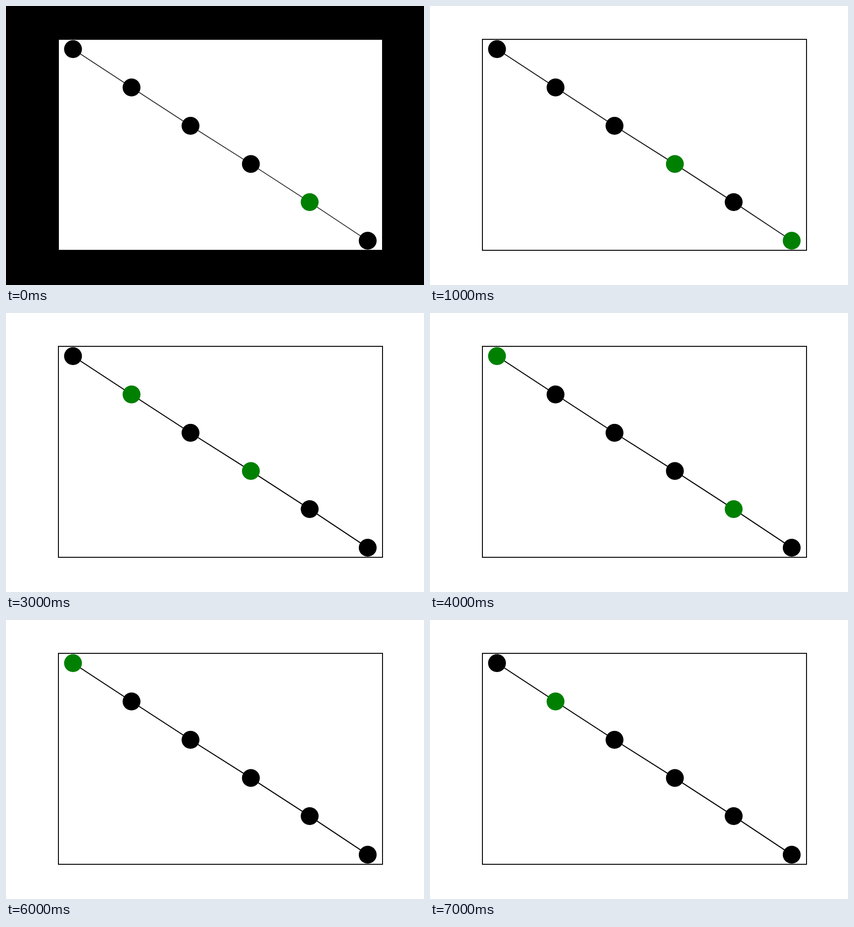
An HTML page with a canvas that plays this animation: 917 by 611 pixels, repeating every 8000 ms.

```html
<!DOCTYPE html>
<html lang="en">
<head>
<meta charset="utf-8">
<title>Cellular automaton on a path</title>
<style>
  html, body { margin: 0; width: 917px; height: 611px; overflow: hidden; background: #fff; }
  canvas { display: block; }
</style>
</head>
<body>
<canvas id="stage" width="917" height="611"></canvas>
<script>
const ctx = document.getElementById('stage').getContext('2d');
const nodes = [[147, 94.4], [275.4, 178.4], [404.8, 262.4], [537.2, 346], [666.2, 429.5], [793.5, 514]];
const lineColors = ['#363636', '#1a1a1a', '#0b0b0b', '#000'];
const STEP = 1000, STEPS = 8;

// Each cell becomes the XOR of its two neighbours.
const next = cells => cells.map((_, i) => (cells[i - 1] || 0) ^ (cells[i + 1] || 0));
const states = [[0, 0, 0, 0, 1, 0]];
while (states.length < STEPS) states.push(next(states[states.length - 1]));

function draw(step) {
  ctx.fillStyle = step ? '#fff' : '#000';
  ctx.fillRect(0, 0, 917, 611);
  ctx.fillStyle = '#fff';
  ctx.fillRect(115, 73, 711, 462);
  ctx.lineWidth = 2;
  ctx.strokeStyle = '#000';
  ctx.strokeRect(115, 73, 711, 462);

  const tone = Math.min(step, 3);
  ctx.strokeStyle = lineColors[tone];
  ctx.lineWidth = 2 + tone * 0.1;
  ctx.beginPath();
  nodes.forEach(([x, y]) => ctx.lineTo(x, y));
  ctx.stroke();

  nodes.forEach(([x, y], i) => {
    ctx.fillStyle = states[step][i] ? '#008000' : '#000';
    ctx.beginPath();
    ctx.arc(x, y, 19.6, 0, Math.PI * 2);
    ctx.fill();
  });
}

const start = performance.now();
function tick() {
  draw(Math.floor((performance.now() - start) / STEP) % STEPS);
  requestAnimationFrame(tick);
}
tick();
</script>
</body>
</html>
```
